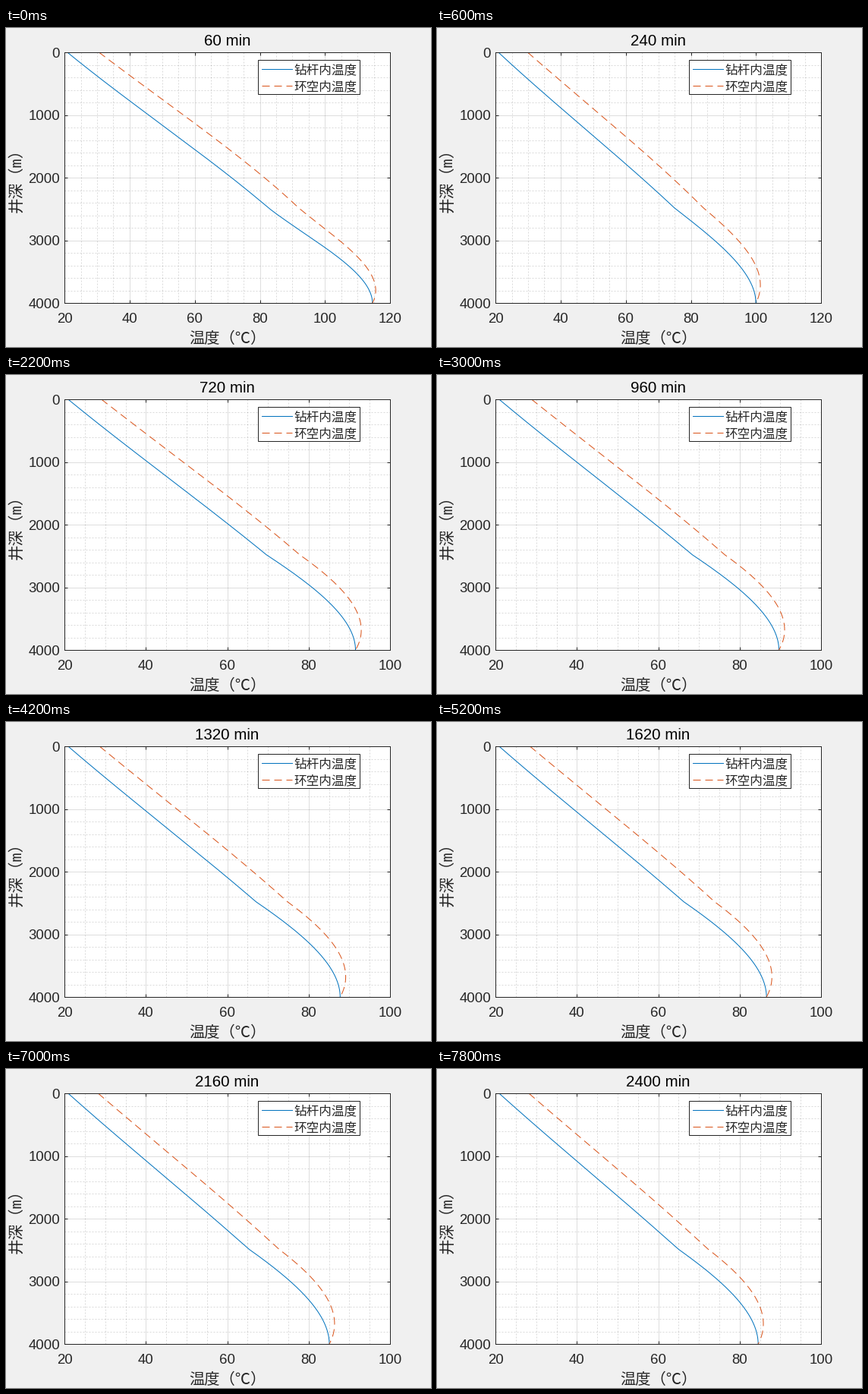
These frames come from a looping animation (560 by 420 pixels, 8000 ms). A matplotlib script:

```python
import numpy as np
import matplotlib.pyplot as plt
from matplotlib.animation import FuncAnimation
from matplotlib.ticker import MultipleLocator

W, H, DPI = 560, 420, 100
PX = 72 / DPI                 # one pixel in points
FRAMES, INTERVAL = 40, 200
STEP_MIN = 60
DEPTH, KINK = 4000, 2480

INK = (0.15, 0.15, 0.15)
BLUE, ORANGE = "#0072bd", "#d95319"
SANS = "Liberation Sans"
CJK = "Noto Sans CJK JP"

depth = np.linspace(0, DEPTH, 401)
upper = depth <= KINK


def profiles(minutes):
    """Pipe and annulus temperature over depth after some circulation time."""
    w = minutes ** -0.25
    x = w - 0.1429
    early = x / 0.2164        # 1 at the start, 0 at the end
    surface = 20.9
    bottom = 64.7 + 138.8 * w
    knee = 64.8 + 100 * x - 82 * x * x
    gap_top = 7.3 + 19.5 * x - 38.8 * x * x
    gap_knee = 7.3 + 20 * x - 50 * x * x
    bulge = 0.4 + 0.8 * early
    bend = 0.6 + 1.5 * early**2

    # Above the kink the pipe warms in proportion to the gap.
    u = depth / KINK
    gap_up = gap_top + (gap_knee - gap_top) * u + 4 * bulge * u * (1 - u)
    heat = (gap_top * u + (gap_knee - gap_top) * u**2 / 2
            + 4 * bulge * (u**2 / 2 - u**3 / 3))
    total = (gap_top + gap_knee) / 2 + 2 * bulge / 3

    v = (DEPTH - depth) / (DEPTH - KINK)
    drop = ((1 + bend) * v**2 / 2 - bend * v**3 / 3) / (0.5 + bend / 6)
    pipe = np.where(upper, surface + (knee - surface) * heat / total,
                    bottom - (bottom - knee) * drop)
    gap = np.where(upper, gap_up, gap_knee * (1.7 * v - 0.7 * v**2))
    return pipe, pipe + gap


fig = plt.figure(figsize=(W / DPI, H / DPI), dpi=DPI, facecolor="#f0f0f0")
ax = fig.add_axes([77.1 / W, (H - 362.1) / H, 429 / W, 330 / H])
ax.set_ylim(DEPTH, 0)
ax.set_axisbelow(True)
ax.xaxis.set_major_locator(MultipleLocator(20))
ax.xaxis.set_minor_locator(MultipleLocator(5))
ax.yaxis.set_major_locator(MultipleLocator(1000))
ax.yaxis.set_minor_locator(MultipleLocator(200))
ax.grid(which="major", color=INK, alpha=0.15, lw=PX)
ax.grid(which="minor", color=INK, alpha=0.17, lw=PX, ls=(0, (2, 2)))
ax.tick_params(which="major", direction="in", top=True, right=True,
               length=4 * PX, width=PX, color=INK, labelcolor=INK,
               labelsize=18.67 * PX, labelfontfamily=SANS)
ax.tick_params(which="minor", length=0)
ax.tick_params(axis="x", pad=12.5 * PX)
ax.tick_params(axis="y", pad=6 * PX)
for side in ax.spines.values():
    side.set(color=INK, linewidth=PX)


def label(x, y, text, size, font, **kw):
    return fig.text(x / W, 1 - y / H, text, fontsize=size * PX,
                    family=font, **kw)


def stroke(x, y, color, dashes="-", **kw):
    return plt.Line2D(x, y, color=color, lw=PX, ls=dashes,
                      dash_capstyle="butt", **kw)


DASH = (0, (10, 6))
pipe_line = ax.add_line(stroke([], [], BLUE))
ann_line = ax.add_line(stroke([], [], ORANGE, DASH))

title = label(291.5, 23, "", 20.5, SANS, ha="center", color="black")
label(291.5, 415, "温度（℃）", 20.3, CJK, ha="center", color=INK)
label(23.5, 196, "井深（m）", 20.5, ["Liberation Mono", CJK], rotation=90,
      ha="right", va="center", color=INK)

# Legend
fig.add_artist(plt.Rectangle((332.1 / W, 1 - 87.1 / H), 134 / W, 45 / H,
                             fc="white", ec=INK, lw=PX, zorder=3))
for y, text, color, dashes in ((54.1, "钻杆内温度", BLUE, "-"),
                               (76.1, "环空内温度", ORANGE, DASH)):
    fig.add_artist(stroke([337 / W, 377 / W], [1 - y / H] * 2, color, dashes,
                          transform=fig.transFigure, zorder=4))
    label(379, y + 6.5, text, 16.6, CJK, color="0.15", zorder=4)


def draw(i):
    minutes = STEP_MIN * (i + 1)
    pipe, ann = profiles(minutes)
    pipe_line.set_data(pipe, depth)
    ann_line.set_data(ann, depth)
    ax.set_xlim(20, 120 if ann.max() > 100 else 100)
    title.set_text(f"{minutes} min")
    return pipe_line, ann_line, title


anim = FuncAnimation(fig, draw, frames=FRAMES, interval=INTERVAL,
                     init_func=lambda: draw(0), repeat=True, repeat_delay=0)
plt.show()
```
